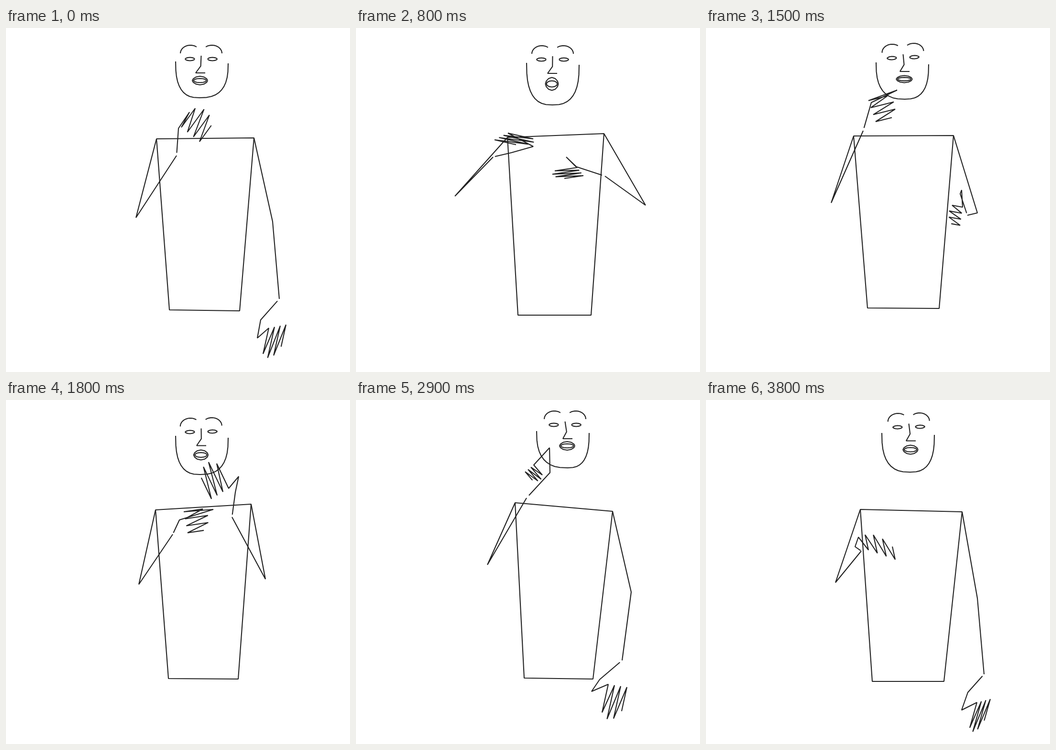
An HTML page with a canvas for the animation above (4000 ms loop, 720 by 720 pixels).

```html
<!DOCTYPE html>
<html lang="en">
<head>
<meta charset="utf-8">
<title>Signing figure</title>
<style>
  html, body { margin: 0; width: 100%; height: 100%; overflow: hidden; background: #fff; }
  canvas { display: block; filter: blur(.5px); }
</style>
</head>
<body>
<canvas width="720" height="720"></canvas>
<script>
const ctx = document.querySelector('canvas').getContext('2d');
const LOOP = 4000, STEP = 100, LAST_STEP = 38;
const FINGERS = [1, 1.2, 1.15, .85];
const EYE_GAP = 47;
const tracks = { body: [], head: [], left: [], right: [] };

const parse = text => text.split(' ').map(p => p.split(',').map(Number));
const mix = (p, q, k) => [p[0] + (q[0] - p[0]) * k, p[1] + (q[1] - p[1]) * k];

function key(name, time, text, dx = 0, dy = 0) {
  tracks[name].push({ time, points: parse(text).map(([x, y]) => [x + dx, y + dy]) });
}

// body: shoulders and hips. head: left eye, mouth, chin, jaw corner, tilt and mouth height.
// arms: elbow, wrist, palm, thumb tip, first knuckle, last knuckle, first fingertip.
function pose(time, body, head, left, right) {
  key('body', time, body);
  key('head', time, head);
  key('left', time, left);
  key('right', time, right);
}

const HANGING = '568,415 582,574 548,612 535,649 567,633 595,626 552,686';

pose(0, '315,232 519,230 489,592 342,590',
  '385,65 406,110 405,146 355,70 0,18',
  '272,397 357,267 361,210 384,176 367,208 405,238 396,168',
  '558,405 572,567 533,611 526,649 550,628 586,621 538,682');
pose(800, '317,229 519,221 492,601 339,601',
  '388,66 410,117 411,161 357,73 0,27',
  '207,352 287,270 325,261 371,248 318,220 290,234 371,232',
  '606,371 521,310 460,290 440,270 463,292 476,309 416,299');
key('right', 1200, HANGING, 4, 0);
pose(1500, '309,226 518,225 488,587 338,586',
  '389,63 415,107 416,149 356,72 -2,15',
  '262,366 329,215 346,156 400,130 340,152 355,196 380,142',
  '568,387 547,392 532,347 535,339 537,375 532,413 515,371');
pose(1800, '313,230 513,218 486,584 340,583',
  '385,67 408,115 406,156 355,75 -1,21',
  '278,386 349,281 363,251 434,229 372,234 380,278 412,228',
  '543,375 473,245 480,193 487,160 466,185 430,207 441,133');
pose(2500, '334,220 523,217 490,587 347,583',
  '382,59 400,105 400,151 361,68 -5,25',
  '277,342 347,314 368,313 404,297 360,316 357,331 412,303',
  '560,364 441,338 424,318 391,341 410,300 425,318 364,301');
pose(2900, '333,215 537,233 496,584 352,582',
  '414,52 442,96 443,142 378,65 0,18',
  '275,345 357,205 406,152 405,100 372,136 354,150 390,157',
  '576,402 557,545 510,585 493,610 528,595 567,601 515,654');
key('right', 3600, HANGING, 12, 18);
pose(3800, '323,229 536,234 498,589 348,589',
  '401,57 428,104 427,151 368,69 -1,19',
  '271,382 325,316 312,307 319,287 340,314 396,334 333,282',
  HANGING);

function sample(keys, time) {
  const next = Math.max(1, keys.findIndex(k => k.time >= time));
  const a = keys[next - 1], b = keys[next];
  const u = (time - a.time) / (b.time - a.time);
  return a.points.map((p, i) => mix(p, b.points[i], u * u * (3 - 2 * u)));
}

function line(points, closed) {
  ctx.beginPath();
  points.forEach(([x, y]) => ctx.lineTo(x, y));
  if (closed) ctx.closePath();
  ctx.stroke();
}

// Samples shape(cos, sin) from one angle to another, in half turns.
function curve(from, to, shape, steps = 12) {
  line(Array.from({ length: steps + 1 }, (_, i) => {
    const angle = Math.PI * (from + (to - from) * i / steps);
    return shape(Math.cos(angle), Math.sin(angle));
  }));
}

const bend = (v, power) => Math.sign(v) * Math.abs(v) ** power;

function drawArm(shoulder, [elbow, wrist, palm, thumb, first, last, tip]) {
  line([shoulder, elbow, wrist]);
  const fingers = FINGERS.flatMap((size, i) => {
    const [x, y] = mix(first, last, i / 3);
    return [[x, y], [x + (tip[0] - first[0]) * size, y + (tip[1] - first[1]) * size]];
  });
  line([mix(wrist, palm, .1), palm, thumb, ...fingers]);
}

function drawHead([eye, mouth, chin, jaw, [tilt, open]]) {
  const slope = tilt / EYE_GAP;
  for (const side of [1, -1]) {
    const [ex, ey] = side > 0 ? eye : [eye[0] + EYE_GAP, eye[1] + tilt];
    const place = (x, y) => [ex + side * x - y * slope, ey + side * x * slope + y];
    curve(0, 2, (c, s) => place(10 * c, 3.5 * bend(s, 1.3)));
    curve(1, 1.71, (c, s) => place(1 + 21 * c, -12 + 17 * s));
  }

  const [mx, my] = mouth, width = 42 - .55 * open;
  const bridge = [eye[0] + EYE_GAP / 2, eye[1] + tilt / 2 - 7];
  const nostril = [mx - 9, bridge[1] + 36];
  const [rx, ry] = mix(bridge, nostril, .6);
  line([bridge, [rx + 6, ry], nostril, [nostril[0] + 20, nostril[1]]]);

  curve(0, 2, (c, s) => [mx + width / 2 * c, my + open / 2 * bend(s, 1.2)]);
  curve(0, 2, (c, s) => [mx + width * .42 * c, my + open * .24 * s]);

  curve(1, 0, (c, s) => {
    const [ex, ey] = c < 0 ? jaw : [jaw[0] + 110, jaw[1] + 4];
    return [chin[0] + (ex - chin[0]) * Math.abs(bend(c, .75)), ey + (chin[1] - ey) * bend(Math.max(s, 0), .75)];
  }, 20);
}

function draw(time) {
  ctx.fillStyle = '#fff';
  ctx.fillRect(0, 0, 720, 720);
  ctx.strokeStyle = '#222';
  ctx.lineWidth = 2.1;
  ctx.lineJoin = 'bevel';

  const body = sample(tracks.body, time);
  line(body, true);
  drawArm(body[0], sample(tracks.left, time));
  drawArm(body[1], sample(tracks.right, time));
  drawHead(sample(tracks.head, time));
}

function tick() {
  const step = Math.floor(performance.now() % LOOP / STEP);
  draw(Math.min(step, LAST_STEP) * STEP);
  requestAnimationFrame(tick);
}
tick();
</script>
</body>
</html>
```
